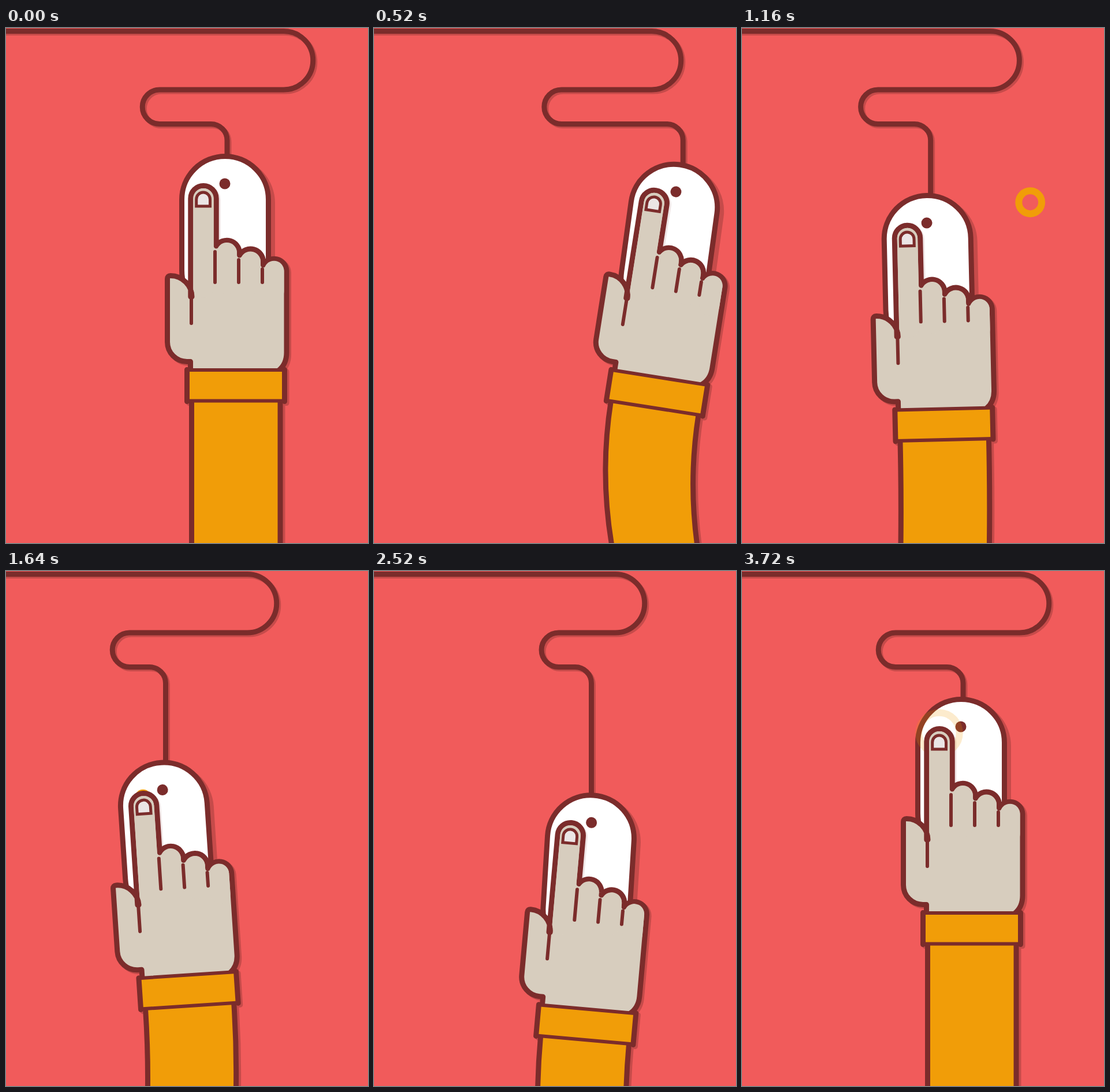
Animation, 627 px wide and 893 px high, one loop 3760 ms. Source, as an HTML page:

```html
<!DOCTYPE html>
<html lang="en">
<head>
<meta charset="utf-8">
<title>Hand and mouse</title>
<style>
  html, body { margin: 0; width: 100%; height: 100%; overflow: hidden; background: #f15b5b; }
  svg { display: block; width: 100vw; height: 100vh; }
  .line { fill: none; stroke: #7b2c2b; stroke-width: 9; stroke-linejoin: round; }
  .shade { fill: none; stroke: #c64b4a; stroke-width: 9; stroke-linejoin: round; }
  .solid { fill: #c64b4a; }
  .thin { stroke-width: 6; stroke-linecap: round; }
  .dark { fill: #7b2c2b; }
  .skin { fill: #d7cdbe; }
  .sleeve { fill: #f19d08; }
  .ring { fill: none; stroke: #f19d08; stroke-width: 12; }
</style>
</head>
<body>
<svg viewBox="0 0 627 893" preserveAspectRatio="none">
  <defs>
    <path id="body" d="M304.5 297.5A75 75 0 0 1 454.5 297.5V420Q454.5 485 379.5 485T304.5 420Z"/>
    <path id="palm" d="M319.5 594V578.5H313.5A34 34 0 0 1 279.5 544.5V435Q279.5 429.5 285 429.5C306 429.5 322 447 322 466H319.8V295.7A22.2 22.2 0 0 1 364.2 295.7V378A22 22 0 0 1 404.5 389.5V394A22 22 0 0 1 445.5 405.5V411A21.75 21.75 0 0 1 486 421V563Q486 583 472 594"/>
  </defs>

  <path id="cableShade" class="shade" transform="translate(3 3)"/>
  <path id="cable" class="line"/>
  <g id="mouseShade"><use href="#body" class="shade solid"/></g>
  <path id="armShade" class="shade" transform="translate(4 3)"/>
  <g id="handShade">
    <use href="#palm" class="shade solid"/>
    <rect x="313.5" y="592.5" width="169" height="55" class="shade solid"/>
  </g>

  <g id="mouse">
    <use href="#body" class="line" style="fill:#fff"/>
    <circle cx="379" cy="270" r="9.5" class="dark"/>
  </g>
  <path id="fingerShade" d="M320 420V295.5A21.8 21.8 0 0 1 363.6 295.5V420" fill="none" stroke="#7b2c2b" stroke-opacity=".12" stroke-width="9"/>
  <g id="rings"></g>

  <path id="armFill" class="sleeve"/>
  <path id="armEdge" class="line"/>
  <g id="hand">
    <use href="#palm" class="line skin"/>
    <g class="skin">
      <rect x="324.2" y="278" width="35.4" height="190" rx="17.7"/>
      <rect x="365" y="372" width="35" height="90" rx="17.5"/>
      <rect x="406" y="388" width="35" height="74" rx="17.5"/>
      <rect x="447" y="403.8" width="34.5" height="70" rx="17.3"/>
    </g>
    <path class="line thin" d="M321 462V512M362 388V441M403 402V441M444 418V441"/>
    <path d="M329.7 309V297A11.9 11.9 0 0 1 353.5 297V309Z" fill="#ebe5e5" stroke="#7b2c2b" stroke-width="5"/>
    <rect x="313.5" y="593" width="169" height="54" class="sleeve"/>
    <path class="line" stroke-linecap="round" d="M313.5 592.5V647.5M482.5 592.5V647.5"/>
    <path class="line thin" d="M313.5 593H482.5M313.5 646.5H482.5"/>
  </g>
</svg>
<script>
const LOOP = 3760, STEP = 40;
const TIP = [341.5, 297], DOT = [379, 270];
const $ = id => document.getElementById(id);
const set = (id, name, value) => $(id).setAttribute(name, value);

// Fingertip, tilt and the two loose cable bends, at rest and at each click
const rest = { x: 341.5, y: 297, r: 0, plug: 383, left: 236 };
const moves = [
  { start: 0, time: 711, click: 750, bow: 48, sway: -4,
    to: { x: 496.5, y: 318, r: 9.7, plug: 548, left: 299.5 } },
  { start: 740, time: 655, click: 1590, bow: 48, sway: 0,
    to: { x: 238.3, y: 409, r: -3.8, plug: 276.5, left: 184 } },
  { start: 1640, time: 524, click: 2300, bow: 0, sway: 0,
    to: { x: 339.5, y: 472.5, r: 5.5, plug: 376, left: 294 } },
  { start: 2260, time: 992, click: 3100, bow: 0, sway: -6, to: rest }
];

function ease(t, start, time) {
  const u = Math.max(0, Math.min(1, (t - start) / time));
  return u < 0.5 ? 4 * u ** 3 : 1 - 4 * (1 - u) ** 3;
}

function turn(x, y, deg) {
  const a = deg * Math.PI / 180, s = Math.sin(a), c = Math.cos(a);
  return [x * c - y * s, x * s + y * c];
}

function poseAt(t) {
  const p = { ...rest, sway: 0 };
  for (const m of moves) {
    const e = ease(t, m.start, m.time);
    for (const k in m.to) p[k] += (m.to[k] - p[k]) * e;
    p.y -= m.bow * Math.sin(Math.PI * e);
    p.sway += m.sway * 4 * e * (1 - e);
  }
  p.right = 481 - 63 * (ease(t, 740, 655) - ease(t, 2860, 480));

  // The mouse rides under the fingertip and slips a little once moved
  const away = Math.hypot(p.x - rest.x, p.y - rest.y);
  const [dx, dy] = turn(DOT[0] - TIP[0], DOT[1] - TIP[1], p.r);
  p.mouseX = p.x + dx - 2.8 * Math.min(1, away / 25);
  p.mouseY = p.y + dy;
  p.mouseR = p.r + p.sway;
  return p;
}

for (const m of moves) {
  const [dx, dy] = turn(0, -16, m.to.r);
  m.ring = document.createElementNS('http://www.w3.org/2000/svg', 'circle');
  m.ring.setAttribute('class', 'ring');
  m.ring.setAttribute('cx', m.to.x + dx);
  m.ring.setAttribute('cy', m.to.y + dy);
  $('rings').append(m.ring);
}

const place = (x, y, r, [px, py]) =>
  `translate(${x} ${y}) rotate(${r}) translate(${-px} ${-py})`;

function cablePath({ left, right, plug, mouseY }) {
  return `M-10 5.5H${right}A50.75 50.75 0 0 1 ${right} 107H${left + 30}` +
    `A29.75 29.75 0 0 0 ${left + 30} 166.5H${plug - 28}` +
    `A28 28 0 0 1 ${plug} 194.5V${mouseY - 38}`;
}

// A sleeve edge leaves the cuff along the hand and bends back towards the elbow
function armEdge(p, edgeX) {
  const [dx, dy] = turn(edgeX - TIP[0], 350, p.r);
  const x = p.x + dx, y = p.y + dy;
  const s = Math.sin(p.r * Math.PI / 180), d = 930 - y;
  return { x, y, mx: x - s * d / 2, my: y + d / 2, ex: x - s * (d - d * d / 240), ey: 930 };
}

function draw(t) {
  const p = poseAt(t);

  const cable = cablePath(p);
  set('cable', 'd', cable);
  set('cableShade', 'd', cable);

  set('mouse', 'transform', place(p.mouseX, p.mouseY, p.mouseR, DOT));
  set('mouseShade', 'transform', place(p.mouseX + 7, p.mouseY + 6, p.mouseR, DOT));
  set('hand', 'transform', place(p.x, p.y, p.r, TIP));
  for (const id of ['handShade', 'fingerShade'])
    set(id, 'transform', place(p.x + 3.5, p.y + 3, p.r, TIP));

  const l = armEdge(p, 321.5), r = armEdge(p, 475);
  const curve = e => `M${e.x} ${e.y}Q${e.mx} ${e.my} ${e.ex} ${e.ey}`;
  set('armEdge', 'd', curve(l) + curve(r));
  set('armShade', 'd', curve(r));
  set('armFill', 'd', `${curve(l)}L${r.ex} ${r.ey}Q${r.mx} ${r.my} ${r.x} ${r.y}Z`);

  for (const { ring, click } of moves) {
    const age = t - click, u = age / 640;
    ring.setAttribute('r', 8 + 29 * u * u);
    ring.setAttribute('opacity', age < 0 ? 0 : Math.max(0, Math.min(1, (670 - age) / 250)));
  }
}

const start = performance.now();
function tick() {
  const t = (performance.now() - start) % LOOP;
  draw(Math.floor(t / STEP) * STEP);
  requestAnimationFrame(tick);
}
tick();
</script>
</body>
</html>
```
